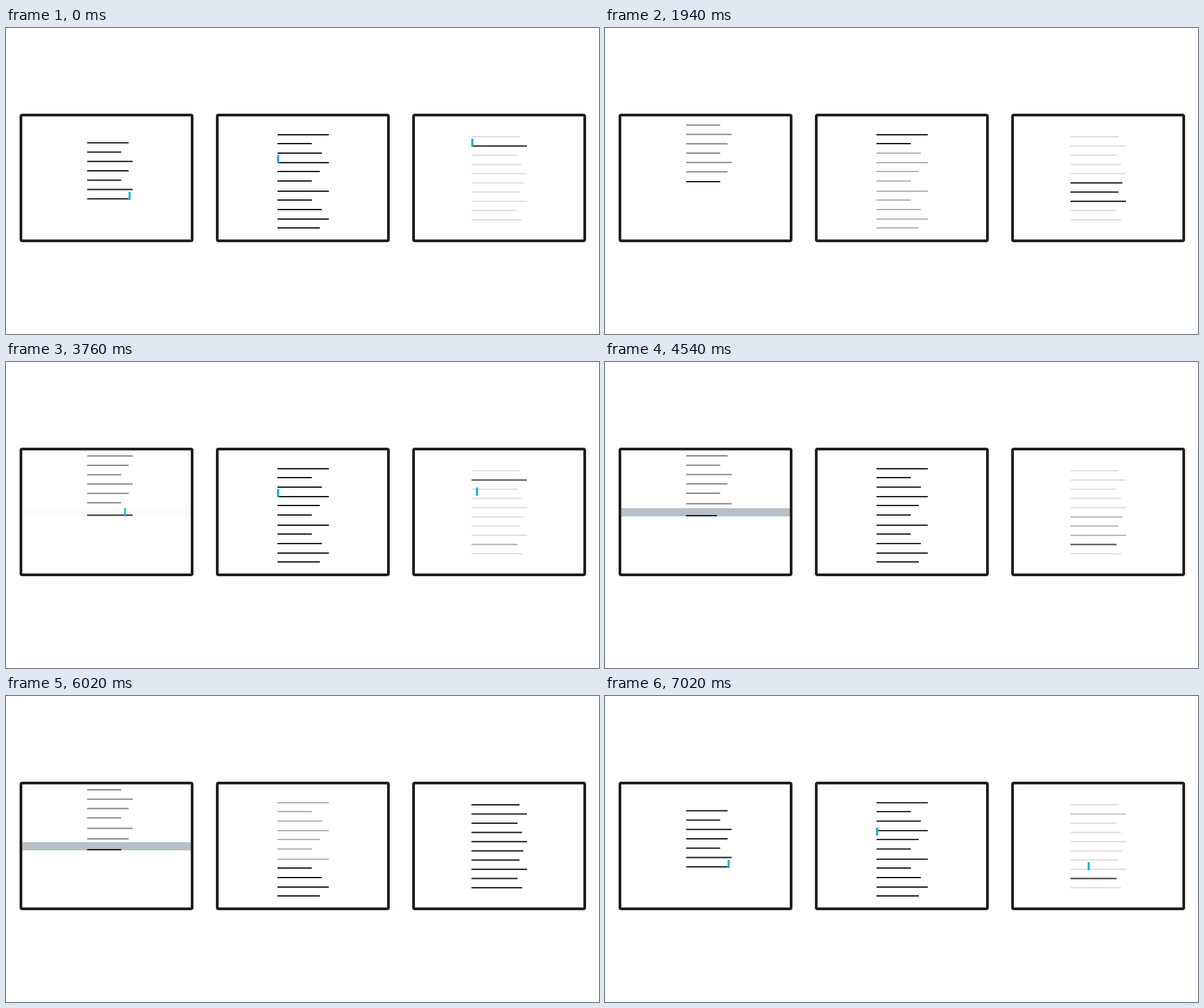
Recreate the animation shown at these times as an HTML page with a canvas. Size 873 by 450 pixels, loop 7.04 s.

```html
<!DOCTYPE html>
<html lang="en">
<head>
<meta charset="utf-8">
<title>Writing modes</title>
<style>
html, body { margin: 0; width: 100%; height: 100%; overflow: hidden; background: #fff; }
canvas { display: block; }
</style>
</head>
<body>
<canvas id="stage" width="873" height="450"></canvas>
<script>
const LOOP = 7040, INK = '#231f20', CYAN = '#11b5c8', BAND = '#b7c0c7';
const ctx = document.getElementById('stage').getContext('2d');
const mix = (a, b, p) => a + (b - a) * p;

// Smooth progress from 0 to 1.
function ease(t, start, duration) {
  const p = Math.min(1, Math.max(0, (t - start) / duration));
  return p * p * (3 - 2 * p);
}

function box(x, y, w, h, color, alpha = 1) {
  ctx.globalAlpha = alpha;
  ctx.fillStyle = color;
  ctx.fillRect(x, y, w, h);
  ctx.globalAlpha = 1;
}
const line = (x, y, w, alpha) => box(x, y - 1, w, 2, INK, alpha);
const cursor = (x, y, alpha) => box(x, y, 3, 12, CYAN, alpha);

// Cursor opacity, given the times when it fades out and back in.
const visible = (t, ...gaps) => gaps.reduce(
  (a, [out, back]) => a - ease(t, out, 280) + ease(t, back, 240), 1);

function drawFrame(x) {
  ctx.strokeStyle = INK;
  ctx.lineWidth = 4;
  ctx.beginPath();
  ctx.roundRect(x, 128, 252, 185, 2);
  ctx.stroke();
}

// Typewriter panel: the page scrolls one line, then a new line is typed.
const WIDTHS = [61, 50, 67], FIRST_TYPED = 7, LAST_TYPED = 10;
const LEFT = 119.5, GAP = 13.75, ROUND = 1405, BASELINE = 226;
const SCROLLS = [26, 39.75, 54.75, 72, 85.75];

function drawTypewriter(t) {
  const width = k => WIDTHS[k % 3];
  const start = ease(t, 260, 440), reset = ease(t, 6460, 500);
  const advance = n => ease(t, 845 + ROUND * n, 380);
  const typed = k => k < FIRST_TYPED ? 1 :
    ease(t, 1560 + ROUND * (k - FIRST_TYPED), 4.2 * width(k));
  const settled = k => k < 6 ? start : advance(k - 6);

  let scroll = SCROLLS[0] * start;
  for (let n = 1; n < SCROLLS.length; n++) {
    scroll += (SCROLLS[n] - SCROLLS[n - 1]) * advance(n - 1);
  }
  scroll = mix(scroll, 3 * GAP, reset);

  ctx.save();
  ctx.beginPath();
  ctx.rect(24, 130, 248, 181);
  ctx.clip();
  box(24, 215, 248, 12, BAND, ease(t, 3700, 360) - ease(t, 6460, 540));
  for (let k = reset ? 3 : 0; k <= LAST_TYPED; k++) {
    const spread = 1.65 * Math.max(0, k - FIRST_TYPED) * (1 - reset);
    let y = 168.75 + GAP * k - scroll + spread;
    // A new line rests on the baseline until the page moves on.
    if (k >= FIRST_TYPED) y = mix(BASELINE, y, Math.max(settled(k), reset));
    const alpha = k < LAST_TYPED ? mix(1, 0.53, settled(k) * (1 - reset)) : 1 - reset;
    line(LEFT, y, width(k) * typed(k), alpha);
  }
  ctx.restore();

  let column = width(6);
  for (let k = FIRST_TYPED; k <= LAST_TYPED; k++) {
    column = mix(mix(column, 0, advance(k - FIRST_TYPED)), width(k), typed(k));
  }
  cursor(LEFT + mix(column, width(6), reset), 241 - 26 * start * (1 - reset),
    visible(t, [790, 1300], [1660, 2300], [3700, 6700]));
}

// Focus panels step through states: a range of dark lines and a cursor place.
const paragraph = {
  x: 399.7, dim: 0.33, count: 11, widths: [75.6, 50.6, 65.3, 75.6, 62.3, 50.6],
  y: i => 157 + 83 * Math.floor(i / 6) + Math.floor(13.67 * (i % 6)),
  states: [
    { first: 0, last: 10, x: 399, y: 187 },
    { first: 0, last: 1, x: 449, y: 159 },
    { first: 7, last: 10, x: 399, y: 242 }
  ],
  starts: [830, 2180, 2960, 4490, 5180, 6760], duration: 330
};
const sentence = {
  x: 685.3, dim: 0.14, count: 10, widths: [70.7, 81.7, 67.7, 74.4, 81.7, 76.4],
  y: i => 160 + 13.55 * i,
  states: [
    { first: 1, last: 1, x: 685, y: 163 },
    { first: 8, last: 8, x: 715, y: 258 },
    { first: 5, last: 7, x: 685, y: 218 },
    { first: 0, last: 9, x: 685, y: 202 }
  ],
  starts: Array.from({ length: 9 }, (_, k) => 540 + 784 * k), duration: 275
};

function drawFocus(panel, t) {
  const { states, widths, count, dim } = panel;
  const state = panel.starts.reduce((s, start) => s + ease(t, start, panel.duration), 0);
  const step = Math.floor(state), p = state - step;
  const from = states[step % states.length], to = states[(step + 1) % states.length];
  const shade = (s, i) => i >= s.first && i <= s.last ? 1 : dim;
  for (let i = 0; i < count; i++) {
    line(panel.x, panel.y(i), widths[i % 6], mix(shade(from, i), shade(to, i), p));
  }
  cursor(mix(from.x, to.x, p), mix(from.y, to.y, p),
    visible(t, [840, 1300], [1560, 2300], [4290, 6080]));
}

function draw() {
  const t = performance.now() % LOOP;
  box(0, 0, 873, 450, '#fff');
  drawTypewriter(t);
  drawFocus(paragraph, t);
  drawFocus(sentence, t);
  [22, 311, 600].forEach(drawFrame);
  requestAnimationFrame(draw);
}
draw();
</script>
</body>
</html>
```
